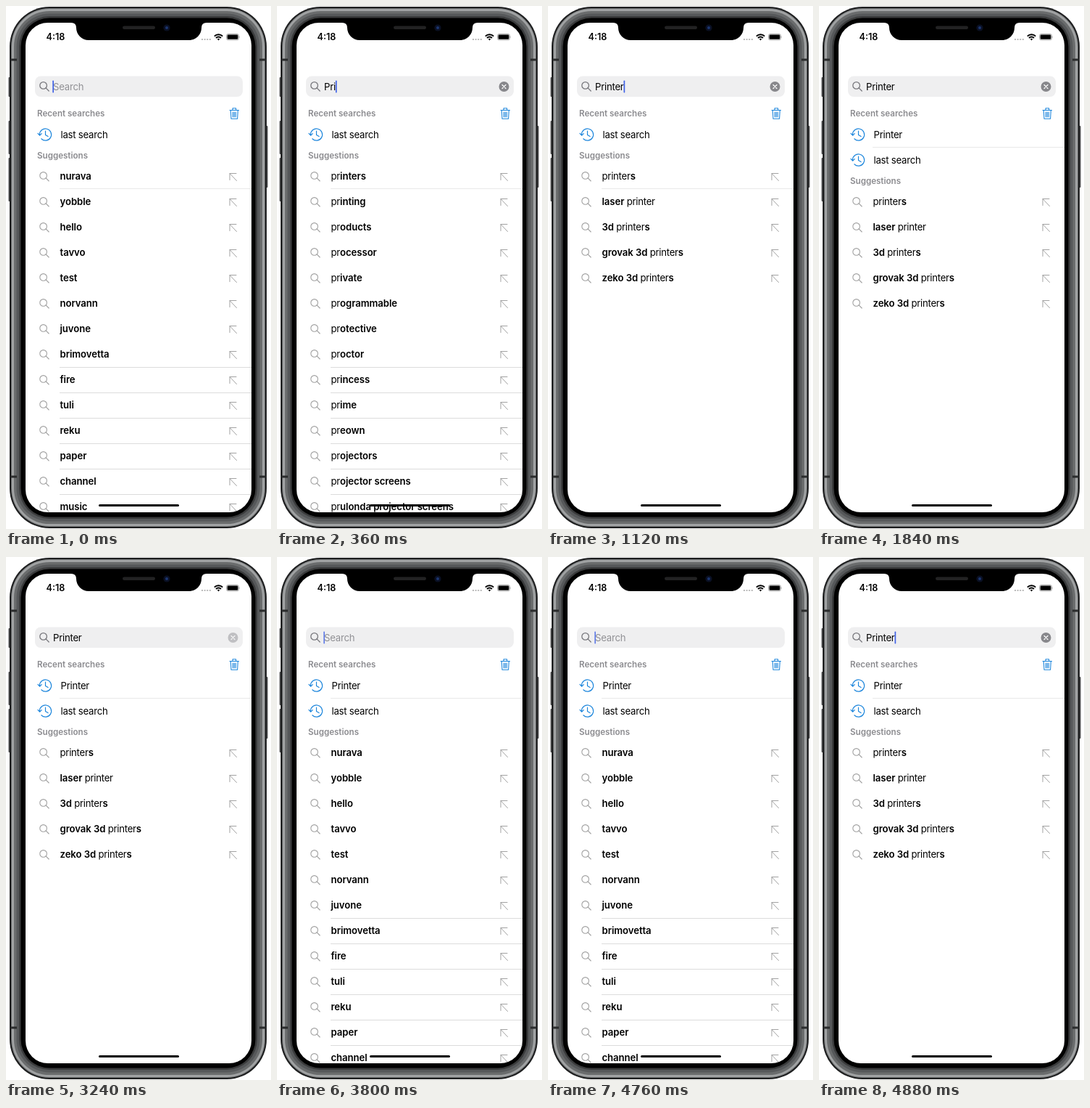
An HTML page for the animation above (4920 ms loop, 366 by 720 pixels).

```html
<!DOCTYPE html>
<html lang="en">
<head>
<meta charset="utf-8">
<title>Search suggestions</title>
<style>
  html, body { margin: 0; width: 100%; height: 100%; overflow: hidden; background: #fff; }
  svg { display: block; width: 366px; height: 720px; }
  text, .thin { font: 400 13.2px Inter, "Liberation Sans", sans-serif; letter-spacing: -.26px; fill: #000; }
  .bold { font-weight: 600; letter-spacing: -.08px; }
  .head { font-size: 11.6px; font-weight: 600; letter-spacing: 0; fill: #8b8b8f; }
  .time { font-size: 12.6px; font-weight: 600; letter-spacing: 0; }
  .hint { fill: #919195; }
  .line { fill: none; stroke-linecap: round; stroke-linejoin: round; }
</style>
</head>
<body>
<svg viewBox="0 0 366 720">
  <defs>
    <clipPath id="screen"><rect x="27" y="23" width="312" height="674" rx="31"/></clipPath>
    <g id="lens" class="line"><circle cx="-1.4" cy="-1.6" r="4.8"/><path d="M2.1 1.9 6.2 6"/></g>
    <path id="arrow" class="line" stroke="#a2a2a2" d="M5 5.5-4.5-4.5M4.5-4.5h-9v9"/>
    <g id="clock" class="line" stroke="#1d86dc" stroke-width="1.2">
      <path d="M-7.6 0A8.1 8.1 0 1 1-5.2 5.8M-10-1.6-7.5 1.2-4.8-1.4M.5-4.8V.4L4 2.6"/>
    </g>
  </defs>

  <!-- side buttons, then the body from the metal rim inwards -->
  <g fill="#4a4b4c">
    <rect x="3.5" y="98" width="4" height="27" rx="1"/>
    <rect x="3.5" y="158" width="4" height="46" rx="1"/>
    <rect x="3.5" y="209" width="4" height="60" rx="1"/>
    <rect x="357" y="165" width="4.5" height="85" rx="1"/>
  </g>
  <rect x="5" y="1" width="355" height="718" rx="55" fill="#1c1d1e"/>
  <rect x="7" y="3" width="351" height="714" rx="53" fill="#6a6c6d"/>
  <rect x="9.5" y="5.5" width="346" height="709" rx="50.5" fill="none" stroke="#a0a2a3" stroke-width="3"/>
  <rect x="14.5" y="10.5" width="336" height="699" rx="45.5" fill="#56585a"/>
  <rect x="18" y="14" width="329" height="692" rx="42" fill="#3a3b3c"/>
  <rect x="20.5" y="16.5" width="324" height="687" rx="39.5"/>
  <path d="M6 74h9M350 74h9M6 648h9M350 648h9" stroke="#2b2c2d" stroke-width="3"/>
  <rect x="27" y="23" width="312" height="674" rx="31" fill="#fff"/>
  <path d="M90 22V23Q97 23 97 30A17 17 0 0 0 114 47H253A17 17 0 0 0 270 30Q270 23 277 23V22Z"/>
  <rect x="161" y="27.5" width="45" height="4.5" rx="2.2" fill="#222223"/>
  <circle cx="222" cy="30" r="4.6" fill="#0a1024"/>
  <circle cx="222" cy="30" r="2" fill="#1c3670"/>

  <!-- status bar -->
  <text class="time" x="55.5" y="47.3">4:18</text>
  <path d="M270 46h13" stroke="#bbb" stroke-width="2" stroke-dasharray="2 1.6"/>
  <g class="line" stroke="#000" stroke-width="1.9" style="stroke-linecap:butt">
    <path d="M287.8 41.6a8 8 0 0 1 11.4 0M290 44a4.9 4.9 0 0 1 7 0"/>
  </g>
  <path d="M291.8 45.6a2.4 2.4 0 0 1 3.4 0L293.5 47.4Z"/>
  <rect x="304.5" y="38.5" width="17" height="8.4" rx="2.4" fill="none" stroke="#aaa"/>
  <rect x="305.6" y="39.6" width="14.8" height="6.2" rx="1.4"/>
  <path d="M322.5 41.2q1.3 1.5 0 3z" fill="#999"/>

  <!-- search field -->
  <rect x="40" y="96.5" width="287" height="28.5" rx="8" fill="#efeff0"/>
  <use href="#lens" x="53" y="111" stroke="#77777c" stroke-width="1.3"/>
  <text id="entry" x="65" y="115.8"></text>
  <rect id="caret" y="102.5" width="1.7" height="17" rx=".8" fill="#4163e6"/>
  <g id="clear">
    <circle cx="313.5" cy="111" r="7" fill="#87878b"/>
    <path d="M311 108.5l5 5m0-5-5 5" stroke="#fff" stroke-width="1.2" stroke-linecap="round"/>
  </g>

  <text class="head" x="43" y="152.3">Recent searches</text>
  <path class="line" stroke="#1d86dc" stroke-width="1.1"
    d="M309 143.5h12.5M313 143v-2.2h4.6V143M310.3 143.8l.7 11.4h8.6l.7-11.4M313.4 146v6.8M315.3 146v6.8M317.2 146v6.8"/>
  <g id="list" clip-path="url(#screen)"></g>
  <rect x="128" y="686" width="111" height="3" rx="1.5"/>
</svg>

<script>
const LOOP = 4920, FRAME = 40, ROW = 35;
const $ = id => document.getElementById(id);

const split = s => s.split(', ');
const popular = split('nurava, yobble, hello, tavvo, test, norvann, juvone, brimovetta, fire, tuli, reku, paper, channel, music');
const early = split('printers, printing, products, processor, private, programmable, protective, proctor, princess, prime, preown, projectors, projector screens, prulonda projector screens');
const middle = split('printers, printing, laser printer, jet print, qow printing, multifunction print, instant print hw, instant print, 3d printers, velarint instant print hw, velarint instant print, qv multifunction print, tovilima instant print hw, tovilima instant print');
const late = split('printers, laser printer, 3d printers, grovak 3d printers, zeko 3d printers');

// [start, typed text, query answered by the list, recent searches]
const once = ['last search'], twice = ['Printer', 'last search'];
const states = [
  [0, '', '', once],
  [80, 'P', '', once], [160, 'P', 'p', once],
  [240, 'Pr', 'p', once], [320, 'Pr', 'pr', once],
  [360, 'Pri', 'pr', once], [400, 'Pri', 'pri', once],
  [520, 'Prin', 'pri', once], [600, 'Prin', 'prin', once],
  [640, 'Print', 'prin', once], [680, 'Print', 'print', once],
  [840, 'Printe', 'print', once], [880, 'Printe', 'printe', once],
  [960, 'Printer', 'printe', once], [1120, 'Printer', 'printer', once],
  [1840, 'Printer', 'printer', twice],
  [3360, '', '', twice],
  [4880, 'Printer', 'printer', twice]
];

function wordsFor(query) {
  const n = query.length;
  return n == 0 ? popular : n < 4 ? early : n < 6 ? middle : late;
}

const text = (x, y, body, cls = '') => `<text class="${cls}" x="${x}" y="${y}">${body}</text>`;
const rule = y => `<path d="M74 ${y}H339" stroke="#dcdcdc"/>`;

// The matched part is regular, the rest is bold.
const mark = (word, query) => query ? word.replace(query, `<tspan class="thin">${query}</tspan>`) : word;

function drawList(query, recent) {
  const words = wordsFor(query), shift = ROW * (recent.length - 1);
  let out = recent.map((s, i) =>
    `<use href="#clock" x="54" y="${177 + i * ROW}"/>` + text(75.5, 181.8 + i * ROW, s)).join('');
  out += text(43, 210 + shift, 'Suggestions', 'head');
  out += `<g opacity=".6">${rule(recent.length > 1 ? 194.5 : 251.5)}</g>`;
  words.forEach((word, i) => {
    const y = 235 + shift + i * ROW;
    out += `<use href="#lens" x="53" y="${y}" stroke="#a0a0a0" stroke-width="1.1"/>`
      + text(74.5, y + 4.4, mark(word, query), 'bold')
      + `<use href="#arrow" x="313.5" y="${y}"/>`;
  });
  if (words.length > 10) for (let y = 497.5; y < 690; y += ROW) out += rule(y);
  $('list').innerHTML = out;
}

function caretAlpha(t) {
  if (t >= 4880) return 1;
  if (t >= 1840 && t < 3360) return 0;
  const d = t - (t < 1840 ? 1440 : 3800);
  if (d < 0) return 1;
  const phase = d % 960;
  return phase < 360 ? Math.max(0, 1 - (phase + 40) / 200) : Math.min(1, (phase - 320) / 240);
}

let shown, caretX = 65;
function draw(now) {
  const t = Math.floor(now % LOOP / FRAME) * FRAME;
  const state = states.findLast(s => s[0] <= t);
  if (state != shown) {
    const [, typed, query, recent] = shown = state;
    const entry = $('entry');
    entry.textContent = typed || 'Search';
    entry.setAttribute('class', typed ? '' : 'hint');
    caretX = typed ? 65 + entry.getComputedTextLength() : 64.3;
    drawList(query, recent);
  }
  $('caret').setAttribute('x', caretX);
  $('caret').setAttribute('opacity', caretAlpha(t));
  $('clear').setAttribute('opacity', !state[1] ? 0 : t >= 3240 && t < 3360 ? .45 : 1);
}

let start;
function tick(now) {
  start ??= now;
  draw(now - start);
  requestAnimationFrame(tick);
}
requestAnimationFrame(tick);
</script>
</body>
</html>
```
